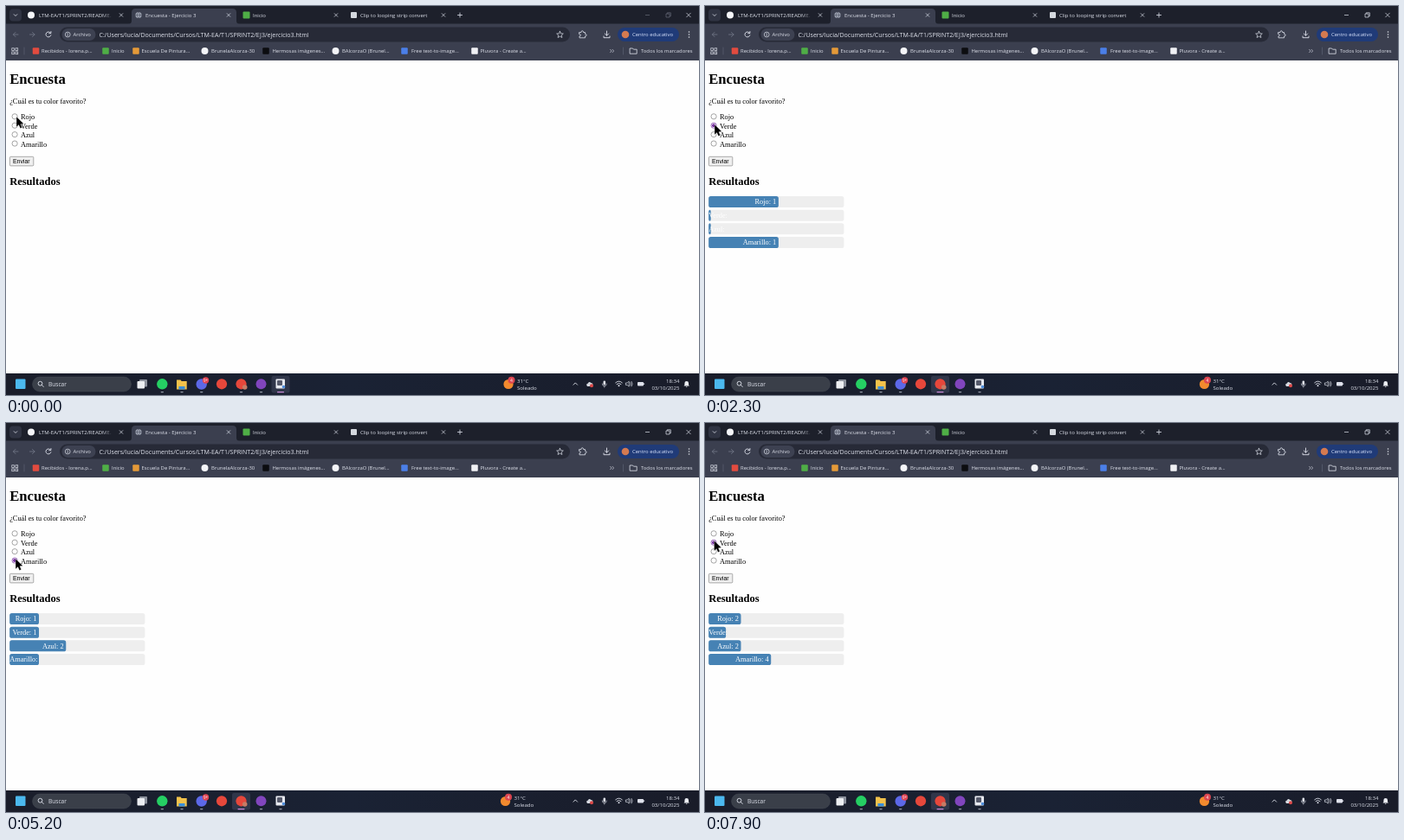
Recreate the animation shown at these times as an HTML page. Size 800 px wide and 450 px high, loop 8000 ms.

```html
<!DOCTYPE html>
<html lang="es">
<head>
<meta charset="utf-8">
<title>Encuesta</title>
<style>
html, body { margin: 0; width: 100%; height: 100%; overflow: hidden; background: #fefefe; }
svg { display: block; width: 100vw; height: 100vh; }
.ui { font-family: "Open Sans", "Noto Sans", sans-serif; }
.page { font-family: "Liberation Serif", "Times New Roman", serif; font-size: 8.333px; }
text { white-space: pre; }
</style>
</head>
<body>
<svg id="stage" viewBox="0 0 800 450" xmlns="http://www.w3.org/2000/svg"></svg>
<script>
const LOOP = 8000, STEP = 100;
const STRIP = '#1d202b', BAR = '#3b3f4f', FIELD = '#272a37', INK = '#dfe2ec', DIM = '#74798a';
const stage = document.getElementById('stage');

const rect = (x, y, w, h, fill, r = 0, extra = '') =>
  `<rect x="${x}" y="${y}" width="${w}" height="${h}" rx="${r}" fill="${fill}" ${extra}/>`;
const disc = (x, y, r, fill, extra = '') => `<circle cx="${x}" cy="${y}" r="${r}" fill="${fill}" ${extra}/>`;
const line = (d, color = INK, w = 0.8, extra = '') =>
  `<path d="${d}" fill="none" stroke="${color}" stroke-width="${w}" stroke-linecap="round" stroke-linejoin="round" ${extra}/>`;
const text = (x, y, s, size, fill = INK, extra = '') =>
  `<text x="${x}" y="${y}" font-size="${size}" fill="${fill}" ${extra}>${s}</text>`;
const cross = (x, y, r, color = INK, w = 0.7) =>
  line(`M${x - r} ${y - r}l${2 * r} ${2 * r}m0 ${-2 * r}l${-2 * r} ${2 * r}`, color, w);
const mark = (x, y, color, s = 8) => rect(x - s / 2, y - s / 2, s, s, color, 1);

function tabs() {
  const titles = [
    [38, 'LTM-EA/T1/SPRINT2/README.'], [161, 'Encuesta - Ejercicio 3'],
    [285, 'Inicio'], [409, 'Clip to looping strip convert']
  ];
  return rect(0, 0, 800, 21, STRIP)
    + rect(4, 3.5, 14, 14, '#303443', 4) + line('M9.2 9.7l1.8 1.8 1.8-1.8')
    + `<path d="M141 21q4 0 4-4V7.500q0-4.500 4.500-4.500h112q4.500 0 4.500 4.500V17q0 4 4 4z" fill="${BAR}"/>`
    + titles.map(([x, s]) => text(x, 12.8, s, 6.03)).join('')
    + rect(110, 4, 15, 14, 'url(#fade)') + rect(125, 4, 4, 14, STRIP)
    + rect(486, 4, 11, 14, 'url(#fade)')
    + [133, 257, 381, 505].map(x => cross(x, 10.5, 1.8)).join('')
    + line('M521.500 10.500h5m-2.500-2.500v5')
    + disc(29, 10.5, 4, '#f4f5f8')
    + disc(153, 10.5, 3.6, '#9da3b1') + line('M149.500 10.500h7M153 7c-2.200 2-2.200 5 0 7c2.200-2 2.200-5 0-7', '#4a5061', 0.6)
    + mark(277.5, 10.5, '#4fae46') + mark(401.5, 10.5, '#d4d8de', 7);
}

function toolbar() {
  return rect(0, 20.5, 800, 42.5, BAR)
    + line('M14 33H8.500m2.500-2.600L8.400 33l2.600 2.600M27.500 33H33m-2.500-2.600L33.100 33l-2.600 2.600', DIM)
    + line('M51.500 31.200a3 3 0 1 0 .4 2.600M51.900 29.500v2.100h-2.100', INK, 0.9)
    + rect(62, 24.5, 589, 17, FIELD, 8.5) + rect(64.5, 26, 39, 14, '#3d4151', 7)
    + disc(71.2, 33, 2.9, 'none', `stroke="${INK}" stroke-width=".7"`) + line('M71.200 32.800v1.500M71.200 31.500v.05')
    + text(77.5, 35.2, 'Archivo', 5.9, INK, 'font-weight="500"')
    + text(107.5, 35.5, 'C:/Users/lucia/Documents/Cursos/LTM-EA/T1/SPRINT2/EJ3/ejercicio3.html', 7.06)
    + line('M639.500 29.300l1.100 2.500 2.700.2-2 1.800.6 2.700-2.400-1.400-2.400 1.400.6-2.700-2-1.800 2.700-.2z', INK, 0.7)
    + line('M662 30.500h2q0-1.800 1.300-1.800t1.300 1.800h2v2q1.600 0 1.600 1.200t-1.600 1.200v1.900H662v-2q1.500-.1 1.500-1.200T662 32.500z')
    + line('M693.500 29v5m-2.200-2l2.200 2.200 2.200-2.200M690 35v1.700h7V35', INK, 0.9)
    + rect(706, 25, 71, 16, '#203b78', 8) + disc(715, 33, 4.3, '#d47a50')
    + text(723, 35.2, 'Centro educativo', 5.95, '#dce6ff', 'font-weight="500"')
    + [30, 33, 36].map(y => disc(788.5, y, 0.8, INK)).join('');
}

function bookmarks() {
  const items = [
    [34.5, '#e24b3f', 41, 'Recibidos - lorena.p...'], [115, '#4fae46', 122, 'Inicio'],
    [150, '#e59a38', 156.5, 'Escuela De Pintura...'], [229.5, '#f4f5f8', 237, 'BrunelaAlcorza-30'],
    [300, '#0c0d10', 307.5, 'Hermosas imágenes...'], [380.5, '#f4f5f8', 388, 'BAlcorzaO (Brunel...'],
    [460, '#4b7fe8', 468, 'Free text-to-image...'], [541, '#f0f1f4', 547.5, 'Pluvora - Create a...']
  ];
  const cells = [[6.8, 48.8], [11, 48.8], [6.8, 53], [11, 53]];
  return cells.map(([x, y]) => rect(x, y, 2.7, 2.7, 'none', 0, `stroke="${INK}" stroke-width=".7"`)).join('')
    + line('M21 48v8M712.500 48v8', '#62677a', 0.6)
    + items.map(([mx, color, x, s]) =>
      (color === '#f4f5f8' ? disc(mx, 52, 4, color) : mark(mx, 52, color, 7.5)) + text(x, 54.2, s, 5.9)).join('')
    + line('M697.500 50.300l1.700 1.700-1.700 1.700m2.500-3.400l1.700 1.700-1.700 1.700', INK, 0.6)
    + line('M720.500 49h3l1 1.200h3.700v5h-7.700z') + text(733, 54.2, 'Todos los marcadores', 5.85);
}

function taskbar() {
  const tray = line('M655 438.200l2.300-2.300 2.300 2.300', INK, 0.9)
    + '<path d="M671 440q-2-2.800.9-3.500q1.200-2.500 3.400-.6q2.500.2 2 2.700q0 1.400-1.400 1.400z" fill="#d7dae1"/>' + disc(676, 439.3, 2, '#d94848')
    + rect(689.5, 433.5, 2.6, 5, INK, 1.3) + line('M688.300 437q0 2.800 2.500 2.800t2.500-2.800m-2.500 2.800v1.400', INK, 0.6)
    + line('M703.700 435.800q3.800-3.500 7.600 0m-6.300 1.700q2.500-2.200 5 0', INK, 0.9) + disc(707.5, 439.3, 1, INK)
    + line('M715.800 436h1.400l2-1.800v6l-2-1.800h-1.400zM720.800 435.600q1.300 1.600 0 3.300m1.300-4.500q2.200 2.800 0 5.600', INK, 0.7)
    + rect(729, 435, 7, 4.4, INK, 1) + rect(736.2, 436.4, 0.9, 1.6, INK)
    + text(777.5, 435.6, '18:34', 6.05, INK, 'text-anchor="end"')
    + text(777.5, 444, '03/10/2025', 6.05, INK, 'text-anchor="end"')
    + '<path d="M782.500 439.500l.9-1.200v-2q0-2.400 2.300-2.400t2.300 2.400v2l.9 1.200zM784.700 440.300h2l-1 .9z" fill="#eceef3"/>';
  return rect(0, 425, 800, 25, 'url(#task)')
    + rect(11, 431.5, 11.5, 11.5, '#4bb8ee', 1)
    + rect(30.5, 429, 114, 17, '#3a3f49', 8.5, 'stroke="#4a4f59" stroke-width=".4"')
    + disc(39.5, 436.7, 2.4, 'none', `stroke="${INK}" stroke-width=".9"`) + line('M41.300 438.500l2 2', INK, 0.9)
    + text(49, 439.9, 'Buscar', 6.6)
    + '<g id="focusBox"></g>'
    + rect(154, 432, 9, 8.5, '#8d929d', 1) + rect(151.5, 434, 8.5, 8.5, '#eceef2', 1)
    + disc(180.3, 437.3, 6.2, '#25cf63')
    + '<path d="M197 432.500h4.500l1.200 1.500h6v9.500H197z" fill="#f3c24b"/>' + rect(199.5, 440, 7, 3.5, '#3b8ed8')
    + disc(225.7, 437.5, 6.2, '#5c68e8') + disc(230.5, 433, 3.7, '#df4453')
    + text(230.4, 434.8, '9+', 4.4, '#fff', 'text-anchor="middle"')
    + disc(249, 437.3, 6.1, '#e6473b') + disc(271.5, 437.3, 6.1, '#e6473b') + disc(275.7, 441, 2.8, '#c77b65')
    + disc(294.5, 437.3, 6, '#8145bd')
    + rect(311.5, 431.5, 10.5, 11, '#e8eaf0', 1) + rect(313, 433, 6, 6, '#55596b', 1) + disc(320.5, 440.5, 1.8, '#4f8edc')
    + [180.3, 203, 225.7, 294.5].map(x => rect(x - 1.7, 446, 3.4, 1.2, '#9298a5', 0.6)).join('')
    + '<g id="weather">' + disc(576.500, 437.5, 5.6, '#f28a2e') + disc(580, 432.8, 4, '#dc4651')
    + text(580, 434.700, '4', 5, '#fff', 'text-anchor="middle"')
    + text(586.5, 435.6, '31°C', 6.1) + text(586.5, 444, 'Soleado', 6.1) + '</g>' + tray;
}

const options = ['Rojo', 'Verde', 'Azul', 'Amarillo'];
const LEFT = 4.17, FULL = 156.25, PAD = 2.6, PITCH = 15.625;

function page() {
  const radios = options.map((name, i) => {
    const y = 127.8 + i * 10.417;
    return disc(10.1, y, 3.1, '#fff', 'class="ring" stroke-width=".65"') + disc(10.1, y, 2, '#6d2399', 'class="dot"')
      + text(17, y + 3.6, name, 8.333, '#000');
  }).join('');
  const bars = options.map((name, i) => {
    const y = 220.1 + i * PITCH;
    return rect(LEFT, y, FULL, 13.02, '#eee', PAD) + rect(LEFT, y, 0, 13.02, '#4682b4', PAD, 'class="fill"')
      + text(LEFT, y + 9.2, '', 8.333, '#fff', 'class="label"');
  }).join('');
  return text(LEFT, 90, 'Encuesta', 16.667, '#000', 'font-weight="700"')
    + text(LEFT, 112.7, '¿Cuál es tu color favorito?', 8.333, '#000') + radios
    + rect(4.4, 174.3, 27.4, 10.6, '#efefef', 1.2, 'id="send" stroke-width=".6"')
    + text(7.9, 181.9, 'Enviar', 6.944, '#000', 'font-family="Liberation Sans, Arial, sans-serif"')
    + text(LEFT, 206.7, 'Resultados', 12.5, '#000', 'font-weight="700"')
    + `<g id="bars">${bars}</g>`;
}

stage.innerHTML = `<defs>
  <linearGradient id="fade"><stop stop-color="${STRIP}" stop-opacity="0"/><stop offset="1" stop-color="${STRIP}"/></linearGradient>
  <linearGradient id="task"><stop stop-color="#1a1d2a"/><stop offset=".5" stop-color="#1a2234"/><stop offset="1" stop-color="#191c29"/></linearGradient>
  </defs>` + rect(0, 0, 800, 450, '#fefefe')
  + `<g class="page">${page()}</g><g class="ui">${tabs()}${toolbar()}${bookmarks()}${taskbar()}</g>`
  + `<g id="controls" fill="none" stroke-width=".7"><path d="M738 10.500h5"/><path d="M762 9h4v4h-4zM763.300 9V7.800h4v4h-1.200"/></g>`
  + cross(788, 10.5, 2.3)
  + '<path id="cursor" d="M0 0V12L2.700 9.600L4.500 13.600L6.700 12.600L5 8.700L8.500 8.300Z" fill="#000" stroke="#fff" stroke-width=".35"/>';

const get = id => document.getElementById(id);
const all = c => [...stage.querySelectorAll('.' + c)];
const rings = all('ring'), dots = all('dot'), fills = all('fill'), labels = all('label');

// Times in ms: [time, option], and [time, x, y] for the pointer.
const FOCUS = 200;
const picks = [[200, 0], [1200, 3], [2200, 1], [3500, 2], [5100, 3], [6700, 0], [7700, 1]];
const votes = [[700, 0], [1600, 3], [2700, 1], [4100, 2], [4600, 2], [5500, 3], [5800, 3], [6100, 3], [7300, 0]];
const pointer = [
  [0, 12, 128], [300, 12, 128], [600, 15, 176], [900, 15, 177], [1200, 11, 157], [1300, 11, 157],
  [1500, 17, 178], [1800, 17, 178], [2200, 11, 137], [2400, 11, 137], [2700, 16, 178], [2900, 16, 177],
  [3100, 15.5, 157.5], [3400, 11, 147], [3600, 11, 147], [3900, 14, 175], [4700, 14, 175],
  [5000, 11, 157], [5200, 11, 157], [5400, 14, 175], [6200, 14, 175], [6600, 11, 126], [6800, 11, 126],
  [7100, 11.5, 168.5], [7200, 13, 176], [7400, 13, 176], [7700, 10.5, 136], [8000, 10.5, 136]
];

function pointerAt(t) {
  const i = pointer.findIndex(p => p[0] > t);
  const [a, b] = [pointer[i - 1], pointer[i]];
  const u = (t - a[0]) / (b[0] - a[0]), k = u * u * (3 - 2 * u);
  return [a[1] + (b[1] - a[1]) * k, a[2] + (b[2] - a[2]) * k];
}

function drawBars(t) {
  const cast = votes.filter(v => v[0] <= t);
  get('bars').style.display = cast.length ? '' : 'none';
  if (!cast.length) return;
  options.forEach((name, i) => {
    const count = cast.filter(v => v[1] === i).length;
    const room = FULL * count / cast.length;
    const label = labels[i];
    fills[i].setAttribute('width', Math.min(FULL, room + PAD));
    label.textContent = `${name}: ${count}`;
    // The count wraps out of sight when the bar is too narrow.
    if (label.getComputedTextLength() > room) label.textContent = `${name}:`;
    label.setAttribute('x', LEFT + Math.max(0, room - label.getComputedTextLength()));
  });
}

function draw(t) {
  const [x, y] = pointerAt(t);
  get('cursor').setAttribute('transform', `translate(${x} ${y})`);

  const picked = picks.filter(p => p[0] <= t).pop();
  rings.forEach((ring, i) => {
    const on = !!picked && picked[1] === i;
    ring.setAttribute('stroke', on ? '#6d2399' : '#767676');
    dots[i].style.display = on ? '' : 'none';
  });

  const hover = x > 4 && x < 32 && y > 174 && y < 185;
  get('send').setAttribute('fill', hover ? '#e3e3e3' : '#efefef');
  get('send').setAttribute('stroke', hover ? '#4f4f4f' : '#767676');

  const focused = t >= FOCUS, app = focused ? 271.5 : 317;
  get('controls').setAttribute('stroke', focused ? INK : '#686c79');
  get('weather').setAttribute('transform', `translate(${focused ? 0 : 3.5} 0)`);
  get('focusBox').innerHTML = rect(app - 10.5, 428, 21, 19.5, '#30364a', 2)
    + [271.5, 317].map(c => c === app
      ? rect(c - 4, 446, 8, 1.3, '#c889d6', 0.6) : rect(c - 1.7, 446, 3.4, 1.2, '#9298a5', 0.6)).join('');
  drawBars(t);
}

const start = performance.now();
function tick() {
  const t = (performance.now() - start) % LOOP;
  draw(Math.floor(t / STEP) * STEP);
  requestAnimationFrame(tick);
}
tick();
</script>
</body>
</html>
```
